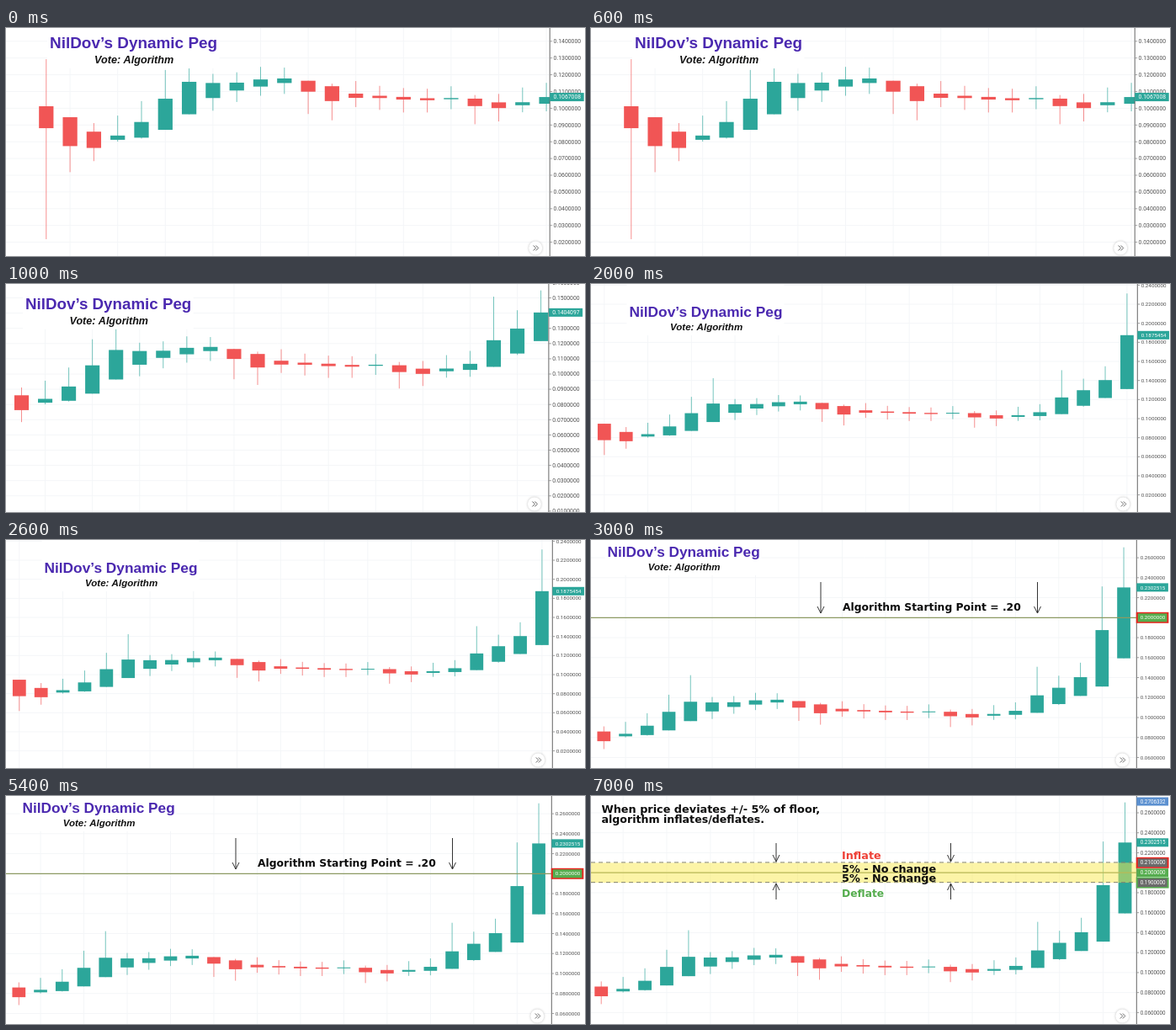
Recreate the animation shown at these times as an HTML page with a canvas. Size 688 by 271 pixels, loop 8 s.

```html
<!DOCTYPE html>
<html lang="en">
<head>
<meta charset="utf-8">
<title>Dynamic Peg</title>
<style>
html, body { margin: 0; width: 100%; height: 100%; overflow: hidden; background: #fff; }
canvas { display: block; }
</style>
</head>
<body>
<canvas id="stage" width="688" height="271"></canvas>
<script>
const ctx = document.getElementById('stage').getContext('2d');
const TEAL = '#2ca69a', RED = '#f15555', GREEN = '#55ad4e', GRAY = '#6a6a6a';
const BLUE = '#5b90d0', ALERT = '#e8251f', GRID = '#f4f6f8';
const ARIAL_LIKE = '"Liberation Sans", Arial, sans-serif';

// Heikin-Ashi closes after the first candle, in ten-thousandths.
const closes = [774, 763, 837, 918, 1057, 1158, 1151, 1153, 1172, 1178, 1099, 1043, 1062,
  1061, 1052, 1048, 1061, 1013, 1001, 1036, 1067.008, 1222, 1298, 1404.097, 1875.454, 2302.515];
const spikes = { 6: 1424, 22: 1508 };

// Each open is the middle of the previous body; wicks lean the way the price moves.
const candles = [{ open: 1012, close: 881, high: 1293, low: 218 }];
closes.forEach((close, k) => {
  const last = candles[k];
  const open = (last.open + last.close) / 2;
  const lean = 0.8 * (close - last.close);
  const high = spikes[k + 1] ?? Math.max(open, close) + Math.max(0, 60 + lean);
  const low = Math.min(open, close) - Math.max(0, 70 - lean);
  candles.push({ open, close, high, low });
});

// gap is the candle spacing and sets the zoom of everything else;
// y100 is the height of price 0.10, unit the pixels per 0.01.
const scenes = [
  { start: 0, first: 0, last: 21, x: 47.8, gap: 28.3, y100: 95.4, unit: 19.9, axis: 646.2, title: [52, 24] },
  { start: 1000, first: 2, last: 24, x: 18.5, gap: 28.05, y100: 107, unit: 18.1, axis: 644.9, title: [23, 30] },
  { start: 2000, first: 1, last: 25, x: 15.8, gap: 25.88, y100: 160, unit: 11.33, axis: 649.3, title: [45.5, 39] },
  { start: 3000, first: 2, last: 26, x: 15.3, gap: 25.74, y100: 211, unit: 11.87, axis: 648.3, title: [19.5, 20],
    overlay: drawStartingPoint },
  { start: 7000, first: 2, last: 26, x: 12.2, gap: 25.93, y100: 209.9, unit: 11.87, axis: 648.3,
    overlay: drawBand }
];

const yOf = (scene, price) => scene.y100 - (price - 0.1) * 100 * scene.unit;
const xOf = (scene, i) => scene.x + (i - scene.first) * scene.gap;
const bodyWidth = scene => scene.gap * 0.61;
const fontSize = scene => scene.gap * 0.242;

function rect(x, y, w, h, color) {
  ctx.fillStyle = color;
  ctx.fillRect(x, y, w, h);
}

function line(points, color, width = 1, dash = []) {
  ctx.beginPath();
  points.forEach(([x, y]) => ctx.lineTo(x, y));
  ctx.setLineDash(dash);
  ctx.strokeStyle = color;
  ctx.lineWidth = width;
  ctx.stroke();
  ctx.setLineDash([]);
}

function text(string, x, y, font, color = '#0c0c0c', baseline = 'alphabetic') {
  ctx.font = font;
  ctx.fillStyle = color;
  ctx.textBaseline = baseline;
  ctx.fillText(string, x, y);
}

const note = (string, x, y, size, color) =>
  text(string, x, y, `bold ${size}px "DejaVu Sans", Verdana, sans-serif`, color);

const level = (scene, y, color, width, dash) => line([[0, y], [scene.axis, y]], color, width, dash);

function axisLabel(scene, string, y, color = '#505050') {
  text(string, scene.axis + 4.4, y + 0.3, `${fontSize(scene)}px Roboto, sans-serif`, color, 'middle');
}

function priceTag(scene, price, fill, border, y = yOf(scene, price)) {
  const width = fontSize(scene) * 4.75 + 8;
  if (border) rect(scene.axis - 0.5, y - 6.5, width + 1, 13, border);
  const inset = border ? 1.5 : 0;
  rect(scene.axis + inset, y - 5, width - 2 * inset, 10, fill);
  axisLabel(scene, price.toFixed(7), y, '#fff');
}

function arrow(x, from, to) {
  const back = to - Math.sign(to - from) * 8;
  line([[x, from], [x, to]], '#333');
  line([[x - 4, back], [x, to], [x + 4, back]], '#333');
}

function eachPriceStep(scene, draw) {
  const step = scene.unit < 15 ? 0.02 : 0.01;
  for (let price = step; price < 0.275; price += step) draw(price, yOf(scene, price));
}

function drawGrid(scene) {
  for (let i = scene.first | 1; i <= scene.last; i += 2) {
    line([[xOf(scene, i), 0], [xOf(scene, i), 271]], GRID);
  }
  eachPriceStep(scene, (price, y) => level(scene, y, GRID));
}

function drawCandles(scene) {
  const width = bodyWidth(scene);
  for (let i = scene.first; i <= scene.last; i++) {
    const { open, close, high, low } = candles[i];
    const y = price => yOf(scene, price / 10000);
    const x = xOf(scene, i);
    const color = close > open ? TEAL : RED;
    ctx.globalAlpha = 0.65;
    line([[x, y(high)], [x, y(low)]], color);
    ctx.globalAlpha = 1;
    rect(x - width / 2, y(Math.max(open, close)), width, Math.max(1, Math.abs(y(open) - y(close))), color);
  }
}

function drawAxis(scene) {
  rect(scene.axis, 0, 688 - scene.axis, 271, '#fff');
  line([[scene.axis, 0], [scene.axis, 271]], '#666');
  eachPriceStep(scene, (price, y) => {
    line([[scene.axis, y], [scene.axis + 3, y]], '#888', 0.8);
    axisLabel(scene, price.toFixed(7), y);
  });
  priceTag(scene, candles[scene.last].close / 10000, TEAL);
}

function drawTitle({ title: [x, y], gap }) {
  const size = gap * 0.669;
  rect(x - 3, 0, size * 10.8, y + size * 1.27, '#fff');
  text('NilDov’s Dynamic Peg', x, y, `bold ${size}px ${ARIAL_LIKE}`, '#4b29b0');
  text('Vote: Algorithm', x + size * 2.8, y + size * 0.945,
    `italic bold ${size * 0.668}px ${ARIAL_LIKE}`, '#111');
}

function drawButton(x, y) {
  ctx.beginPath();
  ctx.arc(x, y, 8, 0, 7);
  ctx.fillStyle = '#fff';
  ctx.shadowColor = 'rgba(0,0,0,.25)';
  ctx.shadowBlur = 3;
  ctx.fill();
  ctx.shadowBlur = 0;
  for (const left of [x - 2.5, x + 0.5]) {
    line([[left, y - 3], [left + 3, y], [left, y + 3]], '#555', 0.9);
  }
}

function drawStartingPoint(scene) {
  level(scene, yOf(scene, 0.2), '#8c9a62', 1.2);
  priceTag(scene, 0.2, GREEN, ALERT);
  note('Algorithm Starting Point = .20', 299, 84, 12.35);
  for (const x of [273, 530.5]) arrow(x, 50, 87);
}

function drawBand(scene) {
  const [top, middle, bottom] = [0.21, 0.2, 0.19].map(price => yOf(scene, price));
  rect(0, top, scene.axis, bottom - top, 'rgba(249,233,80,.5)');
  level(scene, middle, '#b9b957', 1.2);
  for (const y of [top, bottom]) level(scene, y - 0.4, '#83836c', 1, [5, 4]);

  priceTag(scene, 0.2706332, BLUE, null, 6.5);
  priceTag(scene, 0.21, GRAY, ALERT);
  priceTag(scene, 0.19, GRAY, GREEN);
  priceTag(scene, 0.2, GREEN);

  note('When price deviates +/- 5% of floor,', 12.5, 19.5, 12.85);
  note('algorithm inflates/deflates.', 12.5, 32, 12.6);
  note('Inflate', 298, 74.5, 12.8, '#ee4036');
  note('5% - No change', 298, 91, 12.8);
  note('5% - No change', 298, 102, 12.8);
  note('Deflate', 298, 120, 12.3, GREEN);
  for (const x of [220, 427.5]) {
    arrow(x, 56, 78);
    arrow(x, 123, 104);
  }
}

function render(time) {
  const scene = scenes.findLast(s => s.start <= time);
  rect(0, 0, 688, 271, '#fff');
  drawGrid(scene);
  drawCandles(scene);
  if (scene.title) drawTitle(scene);
  drawAxis(scene);
  scene.overlay?.(scene);
  drawButton(scene.axis - 17, 261.5);
}

const startTime = performance.now();
function tick() {
  render((performance.now() - startTime) % 8000);
  requestAnimationFrame(tick);
}
tick();
</script>
</body>
</html>
```
